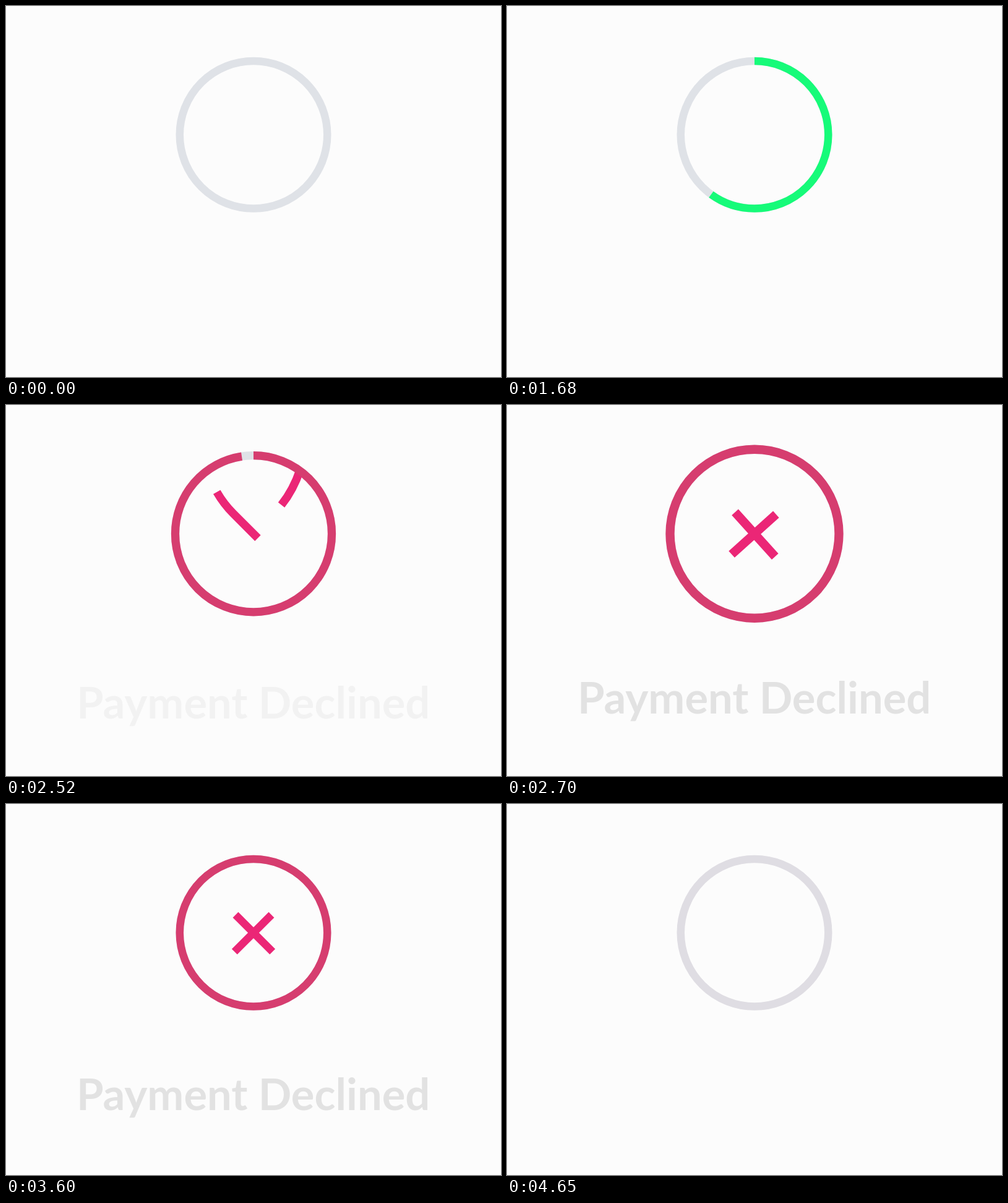
Recreate the animation shown at these times as an HTML page. Size 800 px wide and 600 px high, loop 5.64 s.

```html
<!DOCTYPE html>
<html lang="en">
<head>
<meta charset="utf-8">
<title>Payment status</title>
<style>
html, body { margin: 0; height: 100%; overflow: hidden; background: #fcfcfc; }
svg { display: block; width: 800px; height: 600px; }
path, circle { fill: none; stroke-width: 12.5; }
text { font: bold 70.5px Lato, sans-serif; fill: #e2e2e2; text-anchor: middle; }
</style>
</head>
<body>
<svg viewBox="0 0 800 600">
  <g id="badge">
    <circle r="119.25" stroke="#dfe2e7"/>
    <g id="cross" stroke="#eb2676">
      <path id="left" pathLength="100" d="M-73-104Q-60-60-30.7-30.7L30.7 30.7"/>
      <path id="right" pathLength="100" d="M73-104Q60-60 30.7-30.7L-30.7 30.7"/>
    </g>
    <circle id="arc" r="119.25" pathLength="100" transform="rotate(-90)"/>
  </g>
  <text id="label" x="399.6">Payment Declined</text>
</svg>
<script>
const LOOP = 5640, LAST = 4650, STEP = 30;
const GREEN = [22, 251, 121], RED = [214, 61, 111];
const $ = id => document.getElementById(id);
const badge = $('badge'), cross = $('cross'), arc = $('arc'), label = $('label');

const ratio = (t, from, to) => Math.min(1, Math.max(0, (t - from) / (to - from)));
const ease = x => x * x * (3 - 2 * x);
const tween = (t, from, to) => ease(ratio(t, from, to));

function trim(el, start, end) {
  const len = Math.max(0, end - start);
  el.setAttribute('stroke-dasharray', `0 ${start} ${len} 200`);
  el.style.visibility = len > 0.05 ? 'visible' : 'hidden';
}

// Each bar slides in from the ring and later slides back out.
function bar(el, t, enter, leave, span) {
  const start = tween(t, enter + 60, enter + 240) - tween(t, leave, leave + span * .85);
  const end = tween(t, enter, enter + 210) - tween(t, leave, leave + span);
  trim(el, 51 * start, 100 * end);
}

function draw(t) {
  const swell = tween(t, 2400, 2670) - tween(t, 2670, 3180);
  badge.setAttribute('transform', `translate(400 208.25) scale(${1 + .146 * swell})`);

  // Fill, draw back, then close the ring.
  const fill = ease(ratio(t, 0, 1230) ** 1.1);
  trim(arc, 0, 60 * fill - 30 * tween(t, 1710, 2280) + 70 * tween(t, 2280, 2550));
  const mix = tween(t, 1710, 2040);
  const rgb = GREEN.map((c, i) => Math.round(c + (RED[i] - c) * mix));
  arc.setAttribute('stroke', `rgb(${rgb})`);
  arc.setAttribute('stroke-opacity', 1 - tween(t, 4320, 4690));

  const wobble = 4.4 * Math.sin(2 * Math.PI * ratio(t, 2640, 3150));
  cross.setAttribute('transform', `rotate(${wobble})`);
  bar($('left'), t, 2370, 4040, 330);
  bar($('right'), t, 2430, 3900, 270);

  const risen = tween(t, 2400, 2850) - tween(t, 4080, 4560);
  label.setAttribute('y', 510 - 15 * risen);
  label.setAttribute('opacity', tween(t, 2400, 2700) - tween(t, 4260, 4620));
}

function tick(now) {
  const t = now % LOOP;
  draw(Math.min(LAST, Math.floor(t / STEP) * STEP));
  requestAnimationFrame(tick);
}
draw(0);
requestAnimationFrame(tick);
</script>
</body>
</html>
```
